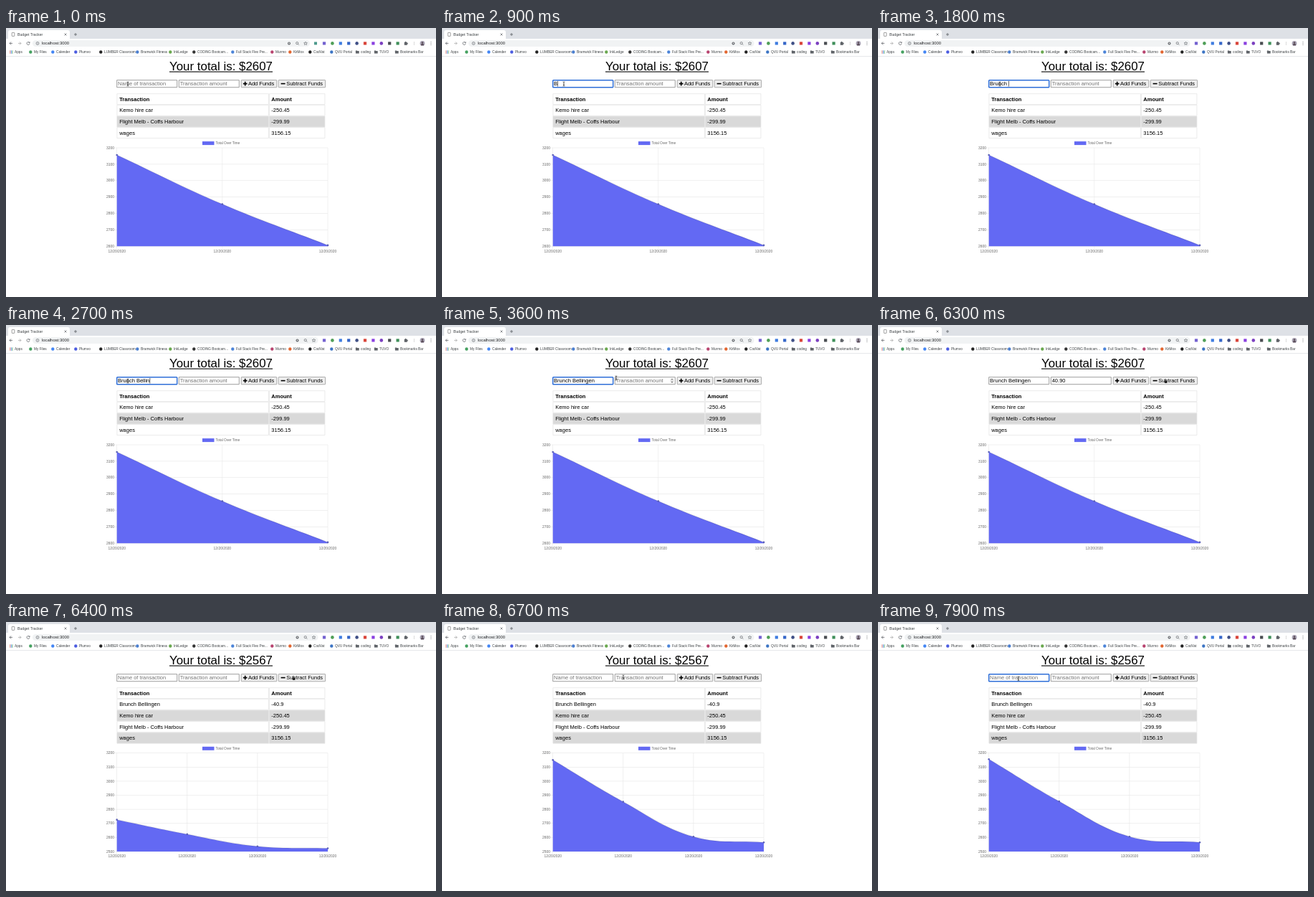
These frames come from a looping animation (600x375 px, 8 s). An HTML page with a canvas:

```html
<!DOCTYPE html>
<html lang="en">
<head>
<meta charset="utf-8">
<title>Budget Tracker</title>
<style>
html, body { margin: 0; width: 100%; height: 100%; overflow: hidden; background: #fff; }
canvas { display: block; }
</style>
</head>
<body>
<canvas id="stage" width="600" height="375"></canvas>
<script>
const ctx = document.getElementById('stage').getContext('2d');
const LOOP = 8000, SUBMIT = 6350;
const INK = '#000', ICON = '#5f6368', BLUE = '#2f6fd8', FILL = '#6369f3';

const bookmarks = [
  [12, 'Apps', '#e0604c'], [39, 'My Files', '#45a160'], [70, 'Calender', '#4285f4'],
  [102, 'Plumvo', '#4a5be0'], [137, 'LUMBER Classroom', '#222'], [188, 'Bramwick Fitness', '#4b7fd0'],
  [234, 'InkLedge', '#6aa84f'], [267, 'CODING Bootcam...', '#333'], [321, 'Full Stack Flex Pre...', '#4b83d8'],
  [376, 'Murmo', '#b8436f'], [401, 'KitMox', '#e2652f'], [429, 'CodVat', '#222'],
  [459, 'QVU Portal', '#3b74c4'], [495, 'coding'], [521, 'TUVO'], [550, 'Bookmarks Bar']
];
const extensions = ['#7462d0', '#4f9f58', '#3f7de0', '#3566c8', '#3f4f86',
  '#d9453a', '#8a3fe0', '#7b3fc0', '#494c50', '#3f8f5a'];
const entries = [['Kemo hire car', '-250.45'], ['Flight Melb - Coffs Harbour', '-299.99'], ['wages', '3156.15']];
const totals = [3156.15, 2856.16, 2605.71, 2564.81];

// Pointer stops: time, x, y
const stops = [[0, 170, 78], [3200, 170, 78], [3600, 243, 74], [3900, 250, 77], [5500, 250, 77],
  [6200, 401, 78], [6400, 401, 78], [6700, 253, 77], [7200, 196, 79], [LOOP, 196, 79]];

// Keystrokes: time of each character
const nameKeys = [...'Brunch Bellingen'].map((c, i) => [i < 7 ? 850 + i * 130 : 1950 + (i - 7) * 130, c]);
const amountKeys = [[4700, '4'], [4900, '0'], [5150, '.'], [5300, '9'], [5450, '0']];

function text(s, x, y, size, color = INK, align = 'left', weight = '') {
  ctx.font = `${weight} ${size}px "Liberation Sans", Arial, sans-serif`;
  ctx.textAlign = align;
  ctx.fillStyle = color;
  ctx.fillText(s, x, y);
  return ctx.measureText(s).width;
}
function rect(x, y, w, h, color) {
  ctx.fillStyle = color;
  ctx.fillRect(x, y, w, h);
}
function box(x, y, w, h, r, fill, stroke, width = 0.8) {
  ctx.beginPath();
  ctx.roundRect(x, y, w, h, r);
  if (fill) { ctx.fillStyle = fill; ctx.fill(); }
  if (stroke) { ctx.strokeStyle = stroke; ctx.lineWidth = width; ctx.stroke(); }
}
function disc(x, y, r, color) {
  ctx.beginPath();
  ctx.arc(x, y, r, 0, 7);
  ctx.fillStyle = color;
  ctx.fill();
}
function path(d, color, width = 0.8, x = 0, y = 0) {
  ctx.save();
  ctx.translate(x, y);
  ctx.strokeStyle = color;
  ctx.lineWidth = width;
  ctx.stroke(new Path2D(d));
  ctx.restore();
}

function drawBrowser(t) {
  rect(0, 0, 600, 15, '#dee1e6');
  box(3, 3, 86, 13, [3, 3, 0, 0], '#fff');
  box(8.2, 6.4, 3.6, 5, 0.5, '#fff', '#777', 0.7);
  text('Budget Tracker', 16, 10.8, 5.2, '#3c4043');
  path('M-1.5-1.5L1.5 1.5M1.5-1.5L-1.5 1.5', ICON, 0.7, 83, 9);
  path('M-2 0H2M0-2V2', ICON, 0.8, 97, 9);

  const shift = t < 500 ? 0 : 11.5;
  box(37, 17, 387 + shift, 9, 4.5, '#f1f3f4');
  path('M2 0H-2M0-2L-2 0L0 2', ICON, 0.8, 7, 21.4);
  path('M-2 0H2M0-2L2 0L0 2', '#aaa', 0.8, 19, 21.4);
  path('M1.8-.9A2 2 0 1 0 2 .4M2-2.2V-.7H.5', ICON, 0.8, 31, 21.4);
  path('M-2 0A2 2 0 1 0 2 0A2 2 0 1 0-2 0M0-.3V1.2M0-1.2V-.7', ICON, 0.6, 44, 21.4);
  text('localhost:3000', 50, 23.4, 5.9, '#202124');
  disc(395 + shift, 21.4, 2, ICON);
  disc(395 + shift, 21.4, 0.8, '#fff');
  path('M1.3-.3A1.6 1.6 0 1 0-1.9-.3A1.6 1.6 0 1 0 1.3-.3M.8 .8L2.3 2.3', ICON, 0.7, 406.5 + shift, 21.4);
  path('M0-2.4L.7-.8L2.4-.7L1.1.4L1.5 2.1L0 1.2L-1.5 2.1L-1.1.4L-2.4-.7L-.7-.8Z', ICON, 0.6, 418 + shift, 21.4);
  if (!shift) box(430, 19.4, 4, 4, 0, '#4d9a8c');
  extensions.forEach((c, i) => {
    const x = 444 + i * 11.4;
    if (i % 3 === 1) disc(x, 21.4, 2.3, c);
    else rect(x - 2.1, 19.3, 4.2, 4.2, c);
  });
  rect(555.8, 19.8, 4, 4, ICON);
  disc(557.6, 19.6, 0.9, ICON);
  disc(560, 21.6, 0.9, ICON);
  rect(569, 19, 0.7, 5, '#ccc');
  disc(581, 21.4, 3.4, '#a9a3b4');
  disc(581, 20.5, 1.2, '#5a4d58');
  box(579, 21.8, 4, 2.4, [2, 2, 0, 0], '#5a4d58');
  for (let i = 0; i < 3; i++) disc(593, 19.6 + i * 1.8, 0.5, ICON);

  for (const [x, label, color] of bookmarks) {
    const cx = x - 4.7;
    if (label === 'Apps') {
      const tones = [color, '#4285f4', '#45a160'];
      for (let i = 0; i < 9; i++) rect(cx - 2.1 + i % 3 * 1.6, 31.4 + (i / 3 | 0) * 1.6, 1.1, 1.1, tones[i % 3]);
    } else if (color) {
      disc(cx, 33.5, 2.2, color);
    } else {
      rect(cx - 2.4, 31.5, 2.2, 1.2, ICON);
      box(cx - 2.4, 32, 4.8, 3.6, 0.4, ICON);
    }
    text(label, x, 35.2, 4.75, '#3c4043');
  }
  rect(0, 39, 600, 0.7, '#dcdee1');
}

function drawField(x, placeholder, keys, t, clearAt, focusFrom, focusTo) {
  const typed = t >= clearAt ? [] : keys.filter(k => k[0] <= t);
  const focused = t >= focusFrom && t < focusTo;
  box(x, 72.7, 84, 10, focused ? 0.8 : 0, '#fff', focused ? BLUE : '#858585', focused ? 1.5 : 0.8);
  const value = typed.map(k => k[1]).join('');
  let width = 0;
  if (value) width = text(value, x + 1.4, 80.4, 7.5);
  else text(placeholder, x + 1.4, 80.4, 7.5, '#757575');
  const since = t - (typed.length ? typed[typed.length - 1][0] : focusFrom);
  if (focused && since % 1000 < 500) rect(x + 1.7 + width, 73.9, 0.6, 7.6, INK);
}

function drawForm(t) {
  drawField(154.7, 'Name of transaction', nameKeys, t, SUBMIT, t < 5000 ? 400 : 7300, t < 5000 ? 3900 : LOOP);
  drawField(241.3, 'Transaction amount', amountKeys, t, SUBMIT, 3900, 6250);
  if (t >= 3500 && t < 6250) {
    box(318.8, 74, 4.2, 7.4, 1, '#eee');
    path('M-1.2-1L0-2.4L1.2-1M-1.2 1L0 2.4L1.2 1', '#444', 0.8, 321, 77.7);
  }
  box(328.2, 72.6, 49.6, 10.2, 0.5, '#efefef', '#8c8c8c', 0.7);
  path('M-2.8 0H2.8M0-2.8V2.8', INK, 1.6, 333.7, 77.6);
  text('Add Funds', 337.9, 80.4, 7.5);
  box(380.2, 72.6, 65.4, 10.2, 0.5, '#efefef', '#8c8c8c', 0.7);
  path('M-3 0H3', INK, 1.6, 386.6, 77.6);
  text('Subtract Funds', 391.2, 80.4, 7.5);
}

function drawTable(rows) {
  [['Transaction', 'Amount'], ...rows].forEach(([label, amount], i) => {
    const y = 91.7 + i * 15.65;
    const fill = i && i % 2 === 0 ? '#d9d9d9' : '#fff';
    const weight = i ? '' : 'bold';
    box(154.9, y, 211.6, 14.9, 0, fill, '#e2e2e2', 0.7);
    box(367.4, y, 77.5, 14.9, 0, fill, '#e2e2e2', 0.7);
    text(label, 158.2, y + 10, 7.5, INK, 'left', weight);
    text(amount, 370.3, y + 10, 7.5, INK, 'left', weight);
  });
}

// Control points of a tension spline, clamped to the plot height
function handles(points, i, top, bottom) {
  const p = points[i], a = points[i - 1] || p, b = points[i + 1] || p;
  const da = Math.hypot(p.x - a.x, p.y - a.y), db = Math.hypot(b.x - p.x, b.y - p.y);
  const at = k => ({ x: p.x + k * (b.x - a.x), y: Math.min(bottom, Math.max(top, p.y + k * (b.y - a.y))) });
  return [at(-0.4 * da / (da + db)), at(0.4 * db / (da + db))];
}

function drawChart(values, min, top, grow) {
  const left = 154.7, right = 449, bottom = top + 137.2, max = 3200, grid = '#e6e6e6';
  rect(274, top - 8.9, 16.5, 5, FILL);
  text('Total Over Time', 292.6, top - 4.6, 4.8, '#666');
  for (let v = min; v <= max; v += 100) {
    const y = bottom - (v - min) / (max - min) * (bottom - top);
    rect(left - 4, y - 0.3, right - left + 4, 0.6, grid);
    text(v, 151, y + 1.7, 4.9, '#666', 'right');
  }
  const points = values.map((v, i) => ({
    x: left + i * (right - left) / (values.length - 1),
    y: bottom - grow * (v - min) / (max - min) * (bottom - top)
  }));
  for (const p of points) {
    rect(p.x - 0.3, top, 0.6, bottom - top + 4, grid);
    text('12/20/2020', p.x, bottom + 8.5, 4.9, '#666', 'center');
  }
  const curve = new Path2D();
  curve.moveTo(points[0].x, points[0].y);
  for (let i = 1; i < points.length; i++) {
    const c = handles(points, i - 1, top, bottom)[1], d = handles(points, i, top, bottom)[0];
    curve.bezierCurveTo(c.x, c.y, d.x, d.y, points[i].x, points[i].y);
  }
  const area = new Path2D(curve);
  area.lineTo(right, bottom);
  area.lineTo(left, bottom);
  ctx.fillStyle = FILL;
  ctx.fill(area);
  ctx.strokeStyle = 'rgba(0,0,0,.1)';
  ctx.lineWidth = 1.25;
  ctx.stroke(curve);
  for (const p of points) disc(p.x, p.y, 1.3, '#5b60b8');
}

function drawPointer(t) {
  const i = stops.findIndex(s => s[0] > t);
  const [t0, x0, y0] = stops[i - 1], [t1, x1, y1] = stops[i];
  const p = (t - t0) / (t1 - t0), k = p * p * (3 - 2 * p);
  const x = x0 + (x1 - x0) * k, y = y0 + (y1 - y0) * k;
  if (x > 328) {
    const hand = new Path2D('M-.9-2.6Q-.3-3.4.2-2.6V-.8L2.4-.2Q3 .2 2.7 1.4L2.2 3H-.6L-2.4.8Q-2.2-.1-.9.5Z');
    ctx.save();
    ctx.translate(x, y);
    ctx.strokeStyle = '#fff';
    ctx.lineWidth = 0.8;
    ctx.stroke(hand);
    ctx.fillStyle = '#222';
    ctx.fill(hand);
    ctx.restore();
  } else {
    path('M-1.4-3Q0-3 0-2.2V2.2Q0 3-1.4 3M1.4-3Q0-3 0-2.2M0 2.2Q0 3 1.4 3M-.8 .9H.8', '#222', 0.7, x, y);
  }
}

function draw(now) {
  const t = Math.floor(now % LOOP / 100) * 100;
  const done = t >= SUBMIT;
  rect(0, 0, 600, 375, '#fff');
  drawBrowser(t);
  const title = `Your total is: $${done ? 2567 : 2607}`;
  const width = text(title, 300, 58.8, 16.9, INK, 'center');
  rect(300 - width / 2, 60.5, width, 1.1, INK);
  drawForm(t);
  drawTable(done ? [['Brunch Bellingen', '-40.9'], ...entries] : entries);
  if (done) {
    const p = Math.min(1, (t - SUBMIT) / 500);
    drawChart(totals, 2500, 182.7, 1 - (1 - p) ** 4);
  } else {
    drawChart(totals.slice(0, 3), 2600, 167, 1);
  }
  drawPointer(t);
}

const start = performance.now();
function tick() {
  draw(performance.now() - start);
  requestAnimationFrame(tick);
}
tick();
</script>
</body>
</html>
```
